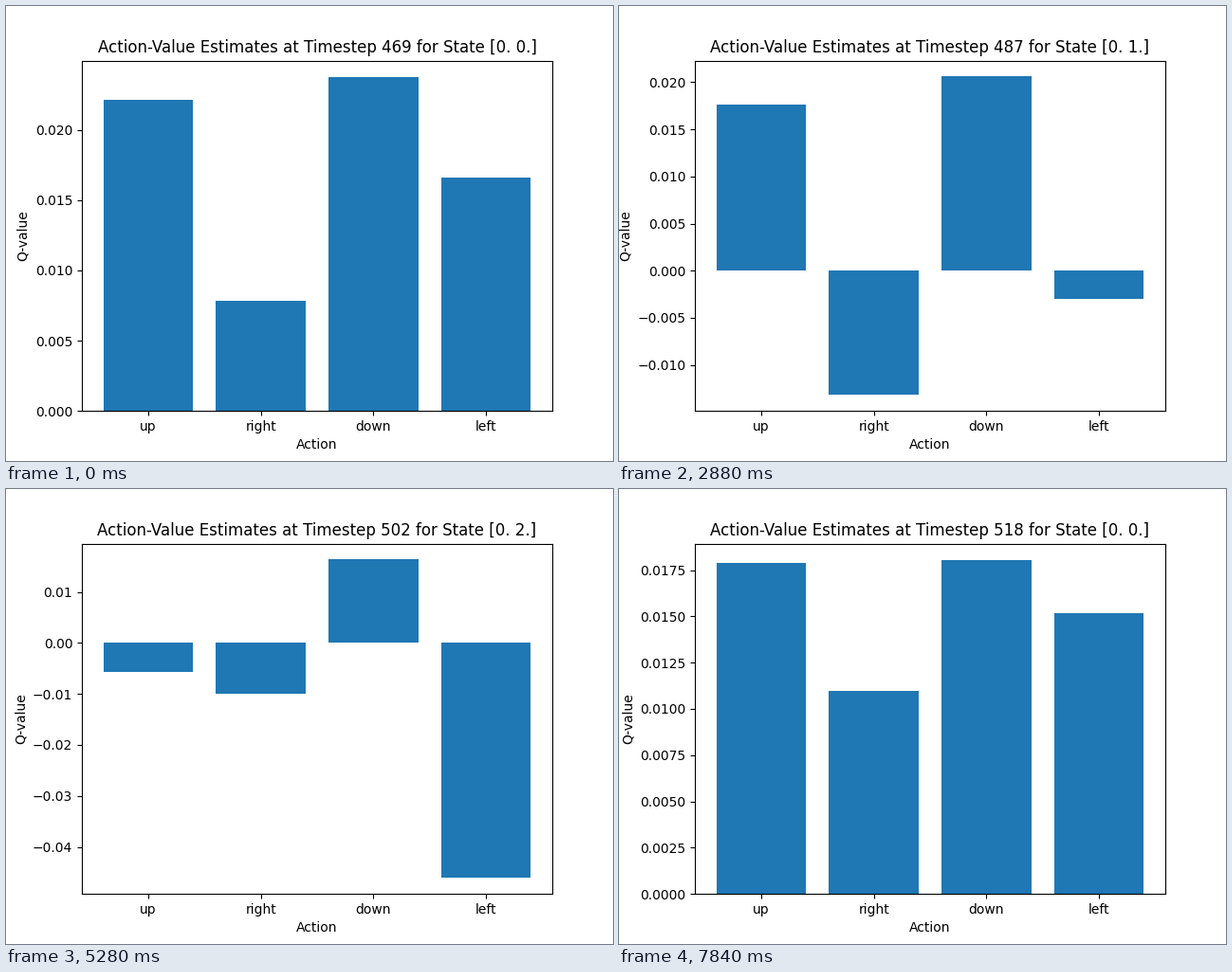
A matplotlib script that plays this animation: 640x480 px, repeating every 8 s.

```python
import matplotlib.pyplot as plt
import numpy as np
from matplotlib.animation import FuncAnimation

FRAMES = 50
STEP_MS = 160
FIRST_STEP = 469
ACTIONS = ["up", "right", "down", "left"]

# Learned values per state: (frame, q-values), drifting linearly in between.
Q_KEYS = {
    (0, 0): [(0, [0.02213, 0.00783, 0.02373, 0.01660]),
             (5, [0.01868, 0.01351, 0.02066, 0.01668]),
             (49, [0.01788, 0.01097, 0.01803, 0.01517])],
    (0, 1): [(13, [0.01760, -0.01440, 0.02115, -0.00325]),
             (39, [0.01792, -0.00813, 0.01836, -0.00179])],
    (0, 2): [(23, [-0.00455, 0.00764, 0.01538, -0.04571]),
             (33, [-0.00570, -0.00998, 0.01634, -0.04611])],
    (1, 2): [(25, [0.00450, 0.01230, 0.01680, 0.00920])],
}

# The agent's walk: (first frame, state entered).
WALK = [(0, (0, 0)), (2, (0, 1)), (3, (0, 0)), (11, (0, 1)), (16, (0, 0)),
        (17, (0, 1)), (19, (0, 2)), (25, (1, 2)), (27, (0, 2)), (37, (0, 1)),
        (40, (0, 0)), (44, (0, 1)), (45, (0, 0))]


def state_at(i):
    return [state for start, state in WALK if start <= i][-1]


def q_values(state, i):
    times, values = zip(*Q_KEYS[state])
    return [np.interp(i, times, column) for column in zip(*values)]


fig, ax = plt.subplots(figsize=(6.4, 4.8), dpi=100)


def draw(i):
    state = state_at(i)
    ax.clear()
    ax.bar(ACTIONS, q_values(state, i), color="#1f77b4")
    ax.set_xlabel("Action")
    ax.set_ylabel("Q-value")
    ax.set_title(f"Action-Value Estimates at Timestep {FIRST_STEP + i} "
                 f"for State [{state[0]}. {state[1]}.]")
    return []


anim = FuncAnimation(fig, draw, frames=FRAMES, interval=STEP_MS,
                     init_func=lambda: draw(0), repeat=True, repeat_delay=0)
plt.show()
```
